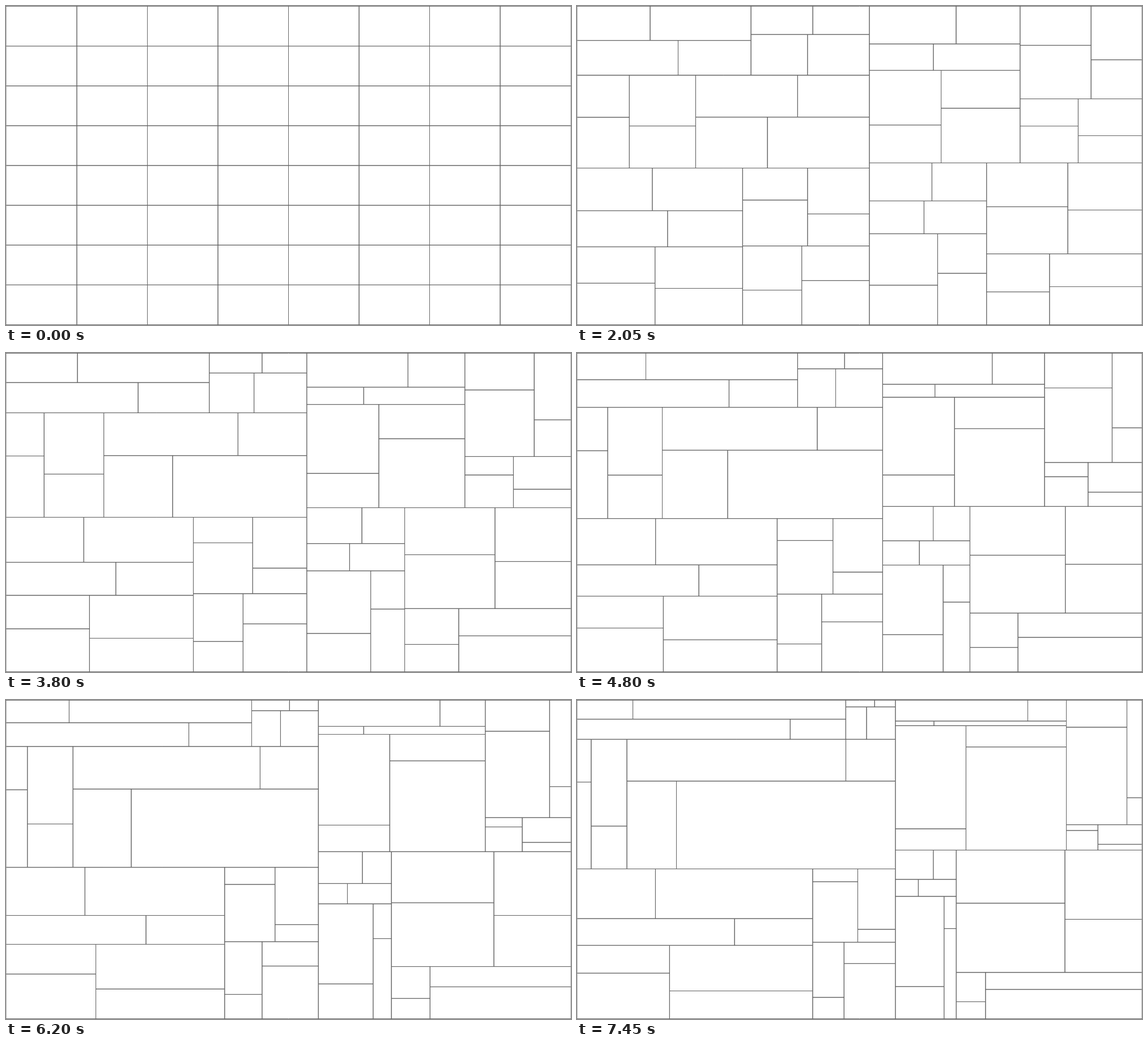
Write an HTML page with a canvas that moves like this. It is 997x562 px and loops after 7500 ms.

```html
<!DOCTYPE html>
<html lang="en">
<head>
<meta charset="utf-8">
<title>Shifting partition</title>
<style>
  html, body { margin: 0; width: 100%; height: 100%; overflow: hidden; background: #fff; }
  canvas { display: block; }
</style>
</head>
<body>
<canvas id="stage" width="997" height="562"></canvas>
<script>
const LOOP = 7500, STEP = 50, LAST = LOOP - STEP;
const INK = '#666', FAINT = '#b3b3b3';

// Each node cuts a box at ratio r; its halves are cut crosswise at q and 1 - q.
// The ratios are those at the end of the loop; all of them start at one half.
const node = (dir, r, q, kids = []) => ({ dir, r, q, kids });
const V = (...args) => node('V', ...args);
const H = (...args) => node('H', ...args);

const tree = V(.5636, .5295, [
  H(.2315, .844, [H(.484, .207), H(.170, .581), V(.280, .330), H(.3225, .8155)]),
  V(.740, .5105, [H(.650, .332), V(.392, .379), V(.545, .1755), V(.379, .721)]),
  V(.694, .1695, [H(.819, .7745), V(.413, .829), V(.804, .2165), V(.419, .227)]),
  V(.247, .2745, [H(.633, .623), V(.800, .737), V(.586, .434), V(.158, .633)])
]);

const ctx = document.getElementById('stage').getContext('2d');

function line(x1, y1, x2, y2, color) {
  ctx.strokeStyle = color;
  ctx.beginPath();
  ctx.moveTo(x1, y1);
  ctx.lineTo(x2, y2);
  ctx.stroke();
}

// Draws one cut and returns the two boxes beside it.
function cut([x, y, w, h], dir, ratio) {
  const vertical = dir === 'V';
  const cx = x + w * ratio, cy = y + h * ratio;
  // Twice, because both neighbouring cells have a border here.
  for (let i = 0; i < 2; i++) {
    if (vertical) line(cx, y, cx, y + h, INK);
    else line(x, cy, x + w, cy, INK);
  }
  return vertical
    ? [[x, y, w * ratio, h], [cx, y, w * (1 - ratio), h]]
    : [[x, y, w, h * ratio], [x, cy, w, h * (1 - ratio)]];
}

function divide(box, { dir, r, q, kids }, p) {
  const ease = end => .5 + (end - .5) * p;
  const cross = dir === 'V' ? 'H' : 'V';
  const [first, second] = cut(box, dir, ease(r));
  const cells = [
    ...cut(first, cross, ease(q)),
    ...cut(second, cross, ease(1 - q))
  ];
  kids.forEach((kid, i) => divide(cells[i], kid, p));
}

function draw(time) {
  const t = Math.floor((time % LOOP) / STEP) * STEP;
  ctx.fillStyle = '#fff';
  ctx.fillRect(0, 0, 997, 562);
  ctx.lineWidth = 1;
  line(.5, 0, .5, 562, FAINT);
  line(996.5, 0, 996.5, 562, FAINT);
  line(0, .5, 997, .5, INK);
  line(0, 561.5, 997, 561.5, INK);
  divide([.5, .5, 996, 561], tree, t / LAST);
}

const start = performance.now();
function tick() {
  draw(performance.now() - start);
  requestAnimationFrame(tick);
}
tick();
</script>
</body>
</html>
```
